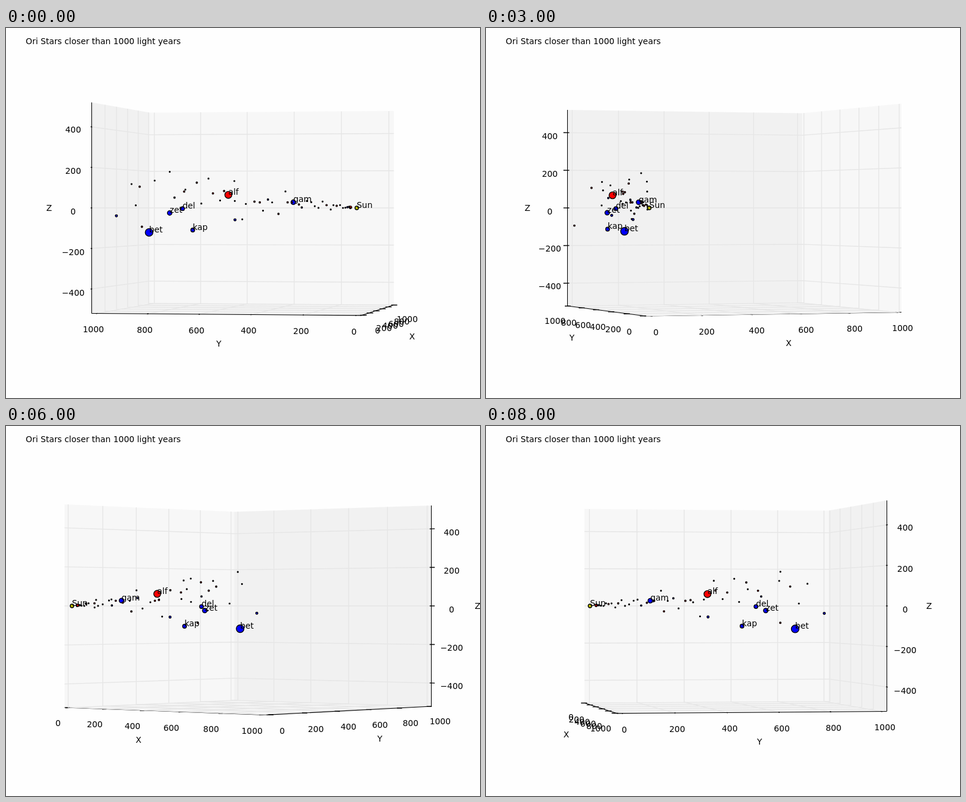
An HTML page that plays this animation: 794x619 px, repeating every 8.5 s.

```html
<!DOCTYPE html>
<html lang="en">
<head>
<meta charset="utf-8">
<title>Ori Stars</title>
<style>
html, body { margin: 0; width: 100%; height: 100%; overflow: hidden; background: #fefefe; }
svg { display: block; width: 794px; height: 619px; font: 13.89px "DejaVu Sans", sans-serif; }
.grid { fill: none; stroke: #e6e6e6; stroke-width: 1.39; }
.axis { stroke: #000; stroke-width: 1.05; }
.tick { stroke: #000; stroke-width: 1.39; }
.star { stroke: #000; stroke-width: 1.39; }
.mid { text-anchor: middle; }
</style>
</head>
<body>
<svg id="plot" viewBox="0 0 794 619"></svg>
<script>
const STEP = 500, STEPS = 17;
const EDGE = 0.5 + 1 / 48, D = 1 / 12;
const CX = 407.3, CY = 301, SX = 4187, SY = 3245, DIST = 10;
const BLUE = '#00f', RED = '#f00', YELLOW = '#bfbf00', DARK = '#003';
const FAINT = 46;

// Light years to the unit cube around the view centre.
const place = (x, y, z) => [x / 1000 - 0.5, y / 1000 - 0.5, z / 1000];

const bright = [
  { name: 'Sun', fill: YELLOW, r: 3, p: place(0, 0, 0) },
  { name: 'alf', fill: RED, r: 5.8, p: place(10, 494, 64) },
  { name: 'bet', fill: BLUE, r: 6.4, p: place(168, 837, -123) },
  { name: 'gam', fill: BLUE, r: 3.9, p: place(38, 248, 28) },
  { name: 'del', fill: BLUE, r: 3.2, p: place(84, 687, -3.5) },
  { name: 'zet', fill: BLUE, r: 3.8, p: place(62, 733, -25) },
  { name: 'kap', fill: BLUE, r: 3.2, p: place(34, 637, -109) },
  { fill: RED, r: 2.1, p: place(8, 25, 3) },
  { fill: BLUE, r: 1.8, p: place(153, 964, -40) },
  { fill: BLUE, r: 1.8, p: place(91, 483, -59) }
];

let seed = 7;
function random() {
  seed = (seed * 16807) % 2147483647;
  return seed / 2147483647;
}

// Faint stars fill a narrow cone that opens from the Sun along Y.
function faintStar(i) {
  const y = 25 + 900 * (i / FAINT) ** 1.4;
  const x = y * (0.22 * (random() + random()) - 0.1);
  const z = y * (0.25 * (random() + random()) - 0.16);
  const hue = random();
  const fill = hue < 0.25 ? RED : hue < 0.4 ? BLUE : DARK;
  return { fill, r: fill === DARK ? 0.9 : 1.25, p: place(x, y, z) };
}

const stars = bright.concat(Array.from({ length: FAINT }, (_, i) => faintStar(i)));

const axes = [
  { name: 'X', from: 0, to: 1000, mid: 500, flip: 1, shade: 242 },
  { name: 'Y', from: 0, to: 1000, mid: 500, flip: 0, shade: 230 },
  { name: 'Z', from: -400, to: 400, mid: 0, flip: 0, shade: 236 }
];

function ticksOf({ from, to, mid }) {
  const list = [];
  for (let v = from; v <= to; v += 200) list.push([(v - mid) / 1000, v]);
  return list;
}

const withAt = (p, i, v) => p.map((c, n) => n === i ? v : c);
const flipAt = (p, i) => withAt(p, i, -p[i]);
const outward = (p, skip, by) => p.map((c, n) => n === skip ? c : c + Math.sign(c) * by);
const xy = p => p.map(v => v.toFixed(2)).join();
const path = (cls, pts) => `<polyline class="${cls}" points="${pts.map(xy).join(' ')}"/>`;
const text = (x, y, s, cls = '') =>
  `<text class="${cls}" x="${x.toFixed(2)}" y="${Math.round(y)}">${s}</text>`;

function draw(azimuth) {
  const a = azimuth * Math.PI / 180, c = Math.cos(a), s = Math.sin(a);
  const toward = p => p[0] * c + p[1] * s;
  const project = p => {
    const w = DIST - toward(p);
    return [CX + SX * (p[1] * c - p[0] * s) / w, CY - SY * p[2] / w];
  };
  const far = [c < -1e-9 ? EDGE : -EDGE, EDGE, -EDGE];
  let out = '';

  axes.forEach(({ shade }, i) => {
    const j = (i + 1) % 3, k = (i + 2) % 3;
    const quad = [far, flipAt(far, j), flipAt(flipAt(far, j), k), flipAt(far, k)];
    out += `<polygon fill="rgba(${shade},${shade},${shade},.5)" points="${quad.map(p => xy(project(p))).join(' ')}"/>`;
  });

  axes.forEach((axis, i) => {
    const { name, flip } = axis, ticks = ticksOf(axis);
    for (const [v] of ticks) {
      const p = withAt(far, i, v);
      out += path('grid', [flipAt(p, (i + 1) % 3), p, flipAt(p, (i + 2) % 3)].map(project));
    }
    const edge = flipAt(far, flip), sign = Math.sign(edge[flip]);
    const ends = [-EDGE, EDGE].map(v => project(withAt(edge, i, v)));
    if (i === 2) for (const e of ends) e[0] = Math.floor(e[0]) + 0.5;
    out += path('axis', ends);

    for (const [v, label] of ticks) {
      const p = withAt(edge, i, v);
      out += path('tick', [0.2, -0.1].map(f =>
        project(withAt(p, flip, p[flip] + sign * f * D))));
      const [x, y] = project(outward(p, i, 0.7 * D));
      out += text(x, y + 10.6, String(label).replace('-', '\u2212'), 'mid');
    }
    const [x, y] = project(outward(withAt(edge, i, 0), i, 1.6 * D));
    out += text(x, y + 5.3, name, 'mid');
  });

  for (const { p, r, fill } of [...stars].sort((m, n) => toward(m.p) - toward(n.p))) {
    const [x, y] = project(p);
    out += `<circle class="star" cx="${x.toFixed(2)}" cy="${y.toFixed(2)}" r="${r}" fill="${fill}"/>`;
  }
  for (const { name, p } of stars) {
    if (name) out += text(...project(p), name);
  }
  return out + text(33, 27, 'Ori Stars closer than 1000 light years');
}

const plot = document.getElementById('plot');
const start = performance.now();
let shown = -1;

function tick() {
  const k = Math.floor((performance.now() - start) / STEP) % STEPS;
  if (k !== shown) {
    plot.innerHTML = draw(-170 + 10 * k);
    shown = k;
  }
  requestAnimationFrame(tick);
}
tick();
</script>
</body>
</html>
```
